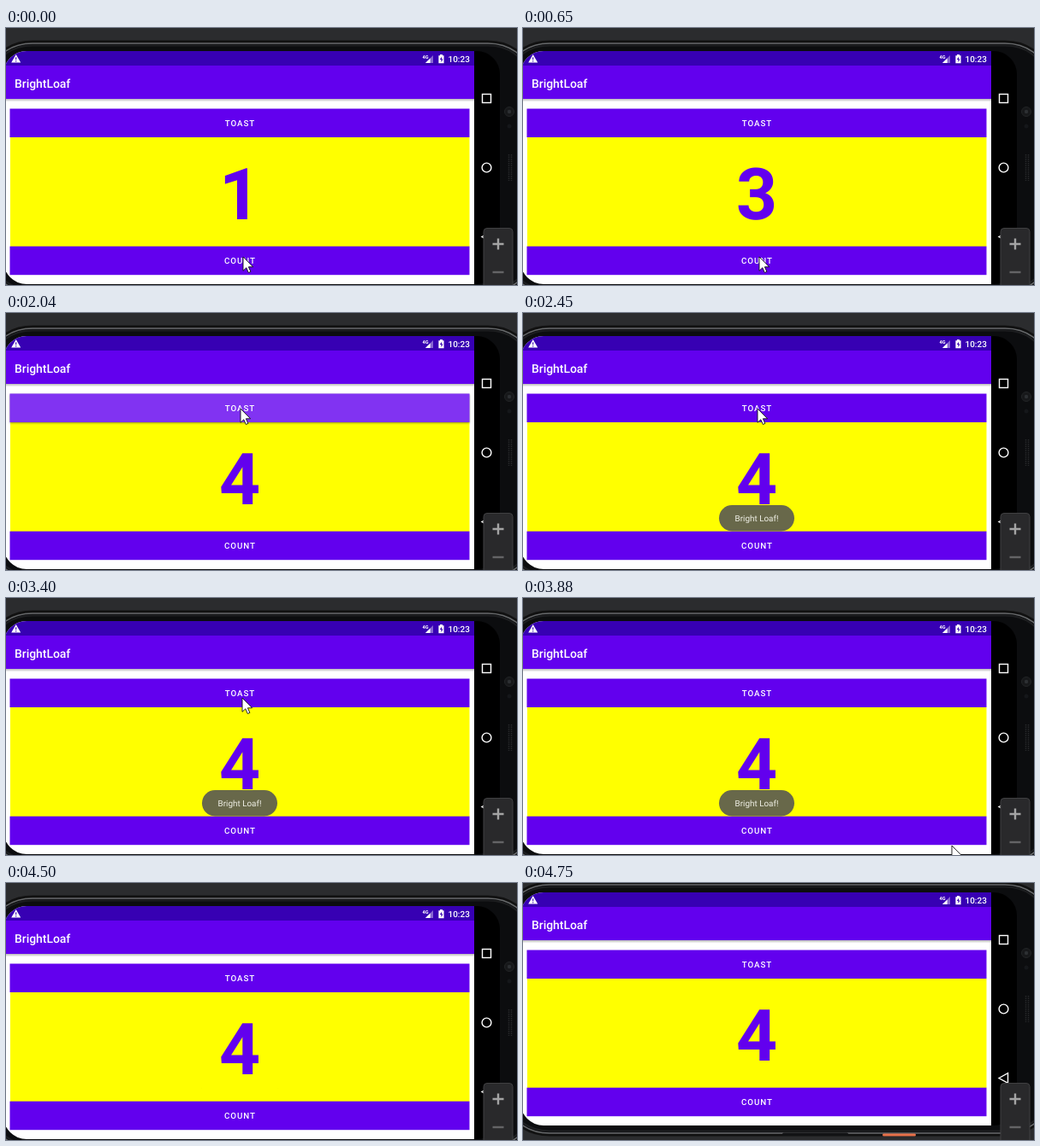
Write an HTML page that moves like this. It is 597 by 301 pixels and loops after 4.85 s.

```html
<!DOCTYPE html>
<html lang="en">
<head>
<meta charset="utf-8">
<title>Counter demo</title>
<style>
  html, body { margin: 0; width: 100%; height: 100%; overflow: hidden; background: #2b2c2e; }
  svg { display: block; width: 597px; height: 301px; }
  text { font-family: Roboto, sans-serif; fill: #fff; text-rendering: geometricPrecision; }
  .mid { text-anchor: middle; }
  .label { font-size: 9.8px; font-weight: 500; letter-spacing: .9px; text-anchor: middle; }
  .icon { fill: none; stroke: #fff; stroke-width: 1.4; }
</style>
</head>
<body>
<svg viewBox="0 0 597 301">
  <defs>
    <linearGradient id="drop" x2="0" y2="1">
      <stop stop-color="#000" stop-opacity=".28"/>
      <stop offset="1" stop-color="#000" stop-opacity="0"/>
    </linearGradient>
    <filter id="soft" x="-5%" y="-30%" width="110%" height="160%">
      <feGaussianBlur stdDeviation="1.3"/>
    </filter>
    <clipPath id="glass"><rect x="-3" y="27" width="580" height="273" rx="27"/></clipPath>
  </defs>
  <rect width="597" height="301" fill="#2b2c2e"/>

  <g id="phone">
    <!-- body and rim -->
    <rect x="-15" y="17.5" width="624" height="292" rx="46" ry="34" fill="#0c0d0f" stroke="#111" stroke-width="6"/>
    <rect x="-15" y="18" width="624" height="291" rx="46" ry="34" fill="#0c0d0f" stroke="#686a6c" stroke-width="1.6"/>
    <rect x="-12" y="20.5" width="618" height="286" rx="43" ry="31" fill="none" stroke="#1d1e20" stroke-width="2"/>
    <rect x="303" y="308.5" width="77" height="3.5" rx="1.5" fill="#121315"/>
    <rect x="420" y="309.5" width="39" height="3" rx="1.5" fill="#e8714a"/>

    <!-- camera and speaker -->
    <circle cx="588" cy="98" r="5.5" fill="#17181a" stroke="#222426"/>
    <circle cx="588" cy="98" r="2.2" fill="#2d3033"/>
    <circle cx="588" cy="115" r="2.5" fill="#15171a"/>
    <path d="M587.5 148v31M590.5 148v31" stroke="#27292b" stroke-width="1.5" stroke-dasharray="1.5 1"/>

    <g clip-path="url(#glass)">
      <rect x="-3" y="27" width="580" height="273"/>
      <rect x="-3" y="27" width="550" height="273" fill="#fff"/>
      <rect x="-3" y="83" width="550" height="3.5" fill="url(#drop)"/>
      <rect x="-3" y="27" width="550" height="17" fill="#3700b3"/>
      <rect x="-3" y="44" width="550" height="39" fill="#6200ee"/>

      <!-- status bar -->
      <path d="M11.7 31L17.2 40.5H6.2Z" fill="#fff"/>
      <path d="M11.7 34.3v3M11.7 38.2v1.2" stroke="#3700b3" stroke-width="1.1"/>
      <text x="486.5" y="35.5" font-size="5.6" font-weight="700">4G</text>
      <path d="M499 32V41H490Z" fill="#fff" opacity=".4"/>
      <path d="M495.6 35.4V41H490Z" fill="#fff"/>
      <path d="M507 31h3v1.2h1.6V41.2h-6.2V32.2h1.6Z" fill="#fff"/>
      <path d="M509.2 33.5l-2.4 3.5h1.6v3l2.2-3.6h-1.5Z" fill="#3700b3"/>
      <text x="516.5" y="40" font-size="10" font-weight="500">10:23</text>

      <text x="10" y="69.5" font-size="13.9" font-weight="500">BrightLoaf</text>

      <rect x="5" y="128" width="536.5" height="128" fill="#ff0"/>
      <text id="digit" class="mid" x="273" y="224" font-size="84" font-weight="700" style="fill:#6200ee">1</text>
      <g id="buttons"></g>

      <g id="toast" opacity="0">
        <rect x="229" y="225" width="88" height="30.5" rx="15.2" fill="#68684a"/>
        <text class="mid" x="273" y="244" font-size="9.9" style="fill:#f0f0e6">Bright Loaf!</text>
      </g>

      <rect class="icon" x="556.5" y="77.5" width="10" height="10"/>
      <circle class="icon" cx="561.5" cy="163.5" r="5.4"/>
      <path class="icon" d="M556 244.5L566.5 238.7V250.3Z"/>
    </g>
  </g>

  <!-- zoom panel -->
  <rect x="558" y="234.5" width="34" height="80" rx="4" fill="#29292b" stroke="#404042"/>
  <path d="M568.5 253h13M575 246.5v13" stroke="#a4a4a4" stroke-width="2.4"/>
  <path d="M568.5 286h13" stroke="#646466" stroke-width="2.4"/>

  <path id="cursor" d="M0 0V16.3L3.8 12.8L6.3 18.5L8.9 17.4L6.4 11.8H11.6Z" fill="#fff" stroke="#111" stroke-width=".9" stroke-linejoin="round"/>
</svg>
<script>
const LOOP = 4850;
const byId = id => document.getElementById(id);

// Each track lists [start time, value...]; a value holds until the next row.
const tracks = {
  count: [[0, 1], [400, 2], [650, 3], [1050, 4]],
  pressCount: [[0, 0], [270, 1], [400, .5], [520, 1], [650, 0], [1050, .8], [1200, .35], [1320, 0]],
  pressToast: [[0, 0], [2040, 1], [2190, .6], [2320, .2], [2450, 0]],
  toast: [[0, 0], [2190, .25], [2320, .7], [2450, 1], [4000, .94], [4120, .8], [4250, .59], [4380, .28], [4500, 0]],
  cursor: [[0, 277, 268], [120, 276, 268], [1200, 276, 214], [1320, 276, 133], [1470, 276, 126.5],
    [1610, 275, 118], [1740, 274, 112], [3400, 276, 117], [3520, 301, 139], [3640, 366, 196],
    [3760, 446, 252], [3880, 501, 290], [4000, 501, 330]],
  lift: [[0, 0], [4750, -16]]
};

function at(name, t) {
  return tracks[name].findLast(row => row[0] <= t).slice(1);
}

function addButton(y, label) {
  const box = `x="4.5" y="${y}" width="537" height="33.5"`;
  byId("buttons").insertAdjacentHTML("beforeend", `<g>
    <rect ${box} transform="translate(0 1)" filter="url(#soft)" opacity="0"/>
    <rect ${box} fill="#6200ee"/>
    <rect ${box} fill="#fff" opacity="0"/>
    <text class="label" x="273.4" y="${y + 20.3}">${label}</text></g>`);
  const [shadow, , ripple] = byId("buttons").lastElementChild.children;
  return press => {
    shadow.setAttribute("opacity", press * .4);
    ripple.setAttribute("opacity", press * .2);
  };
}

const pressToast = addButton(94.5, "TOAST");
const pressCount = addButton(255.7, "COUNT");

function draw(t) {
  byId("digit").textContent = at("count", t)[0];
  pressCount(at("pressCount", t)[0]);
  pressToast(at("pressToast", t)[0]);
  byId("toast").setAttribute("opacity", at("toast", t)[0]);
  byId("cursor").setAttribute("transform", `translate(${at("cursor", t)})`);
  byId("phone").setAttribute("transform", `translate(0 ${at("lift", t)[0]})`);
}

const start = performance.now();
function tick() {
  draw((performance.now() - start) % LOOP);
  requestAnimationFrame(tick);
}
tick();
</script>
</body>
</html>
```
